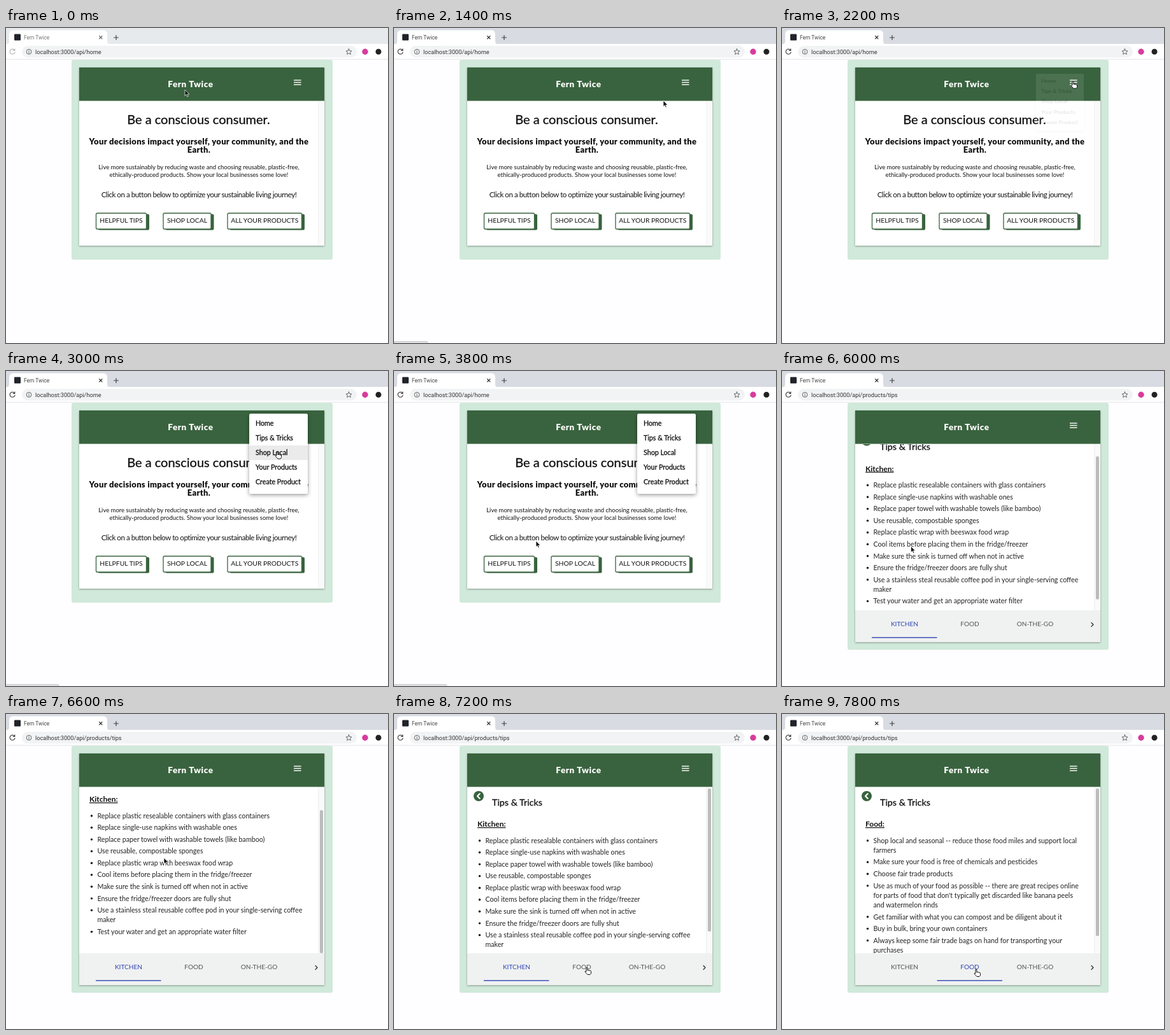
These frames come from a looping animation (600x495 px, 8 s). An HTML page:

```html
<!DOCTYPE html>
<html lang="en">
<head>
<meta charset="utf-8">
<title>Fern Twice</title>
<style>
  html, body { margin: 0; width: 100%; height: 100%; overflow: hidden; background: #fefdff; }
  svg { display: block; width: 100%; height: 100%; }
  text { font-family: Lato, sans-serif; font-size: 10.7px; fill: #111; white-space: pre; }
  .ui { font-family: Roboto, sans-serif; }
  .mid { text-anchor: middle; }
  .firm { stroke: #111; stroke-width: .3px; }
  .line { fill: none; stroke-linecap: round; stroke-linejoin: round; }
  .card { filter: drop-shadow(0 1px 1.5px rgba(0, 0, 0, .35)); }
  .pop { filter: drop-shadow(0 2px 3px rgba(0, 0, 0, .4)); }
</style>
</head>
<body>
<svg id="stage" viewBox="0 0 600 495" preserveAspectRatio="none" xmlns="http://www.w3.org/2000/svg"></svg>
<script>
const LOOP = 8000, STEP = 200;
const GREEN = '#39633e', MINT = '#d0e9da', BLUE = '#2d47b2';

const rect = (x, y, w, h, fill, more = '') =>
  `<rect x="${x}" y="${y}" width="${w}" height="${h}" fill="${fill}" ${more}/>`;
const circle = (x, y, r, fill, more = '') =>
  `<circle cx="${x}" cy="${y}" r="${r}" fill="${fill}" ${more}/>`;
const line = (d, color, width = 1.2, more = '') =>
  `<path class="line" d="${d}" stroke="${color}" stroke-width="${width}" ${more}/>`;
const text = (x, y, s, style = '', cls = '') =>
  `<text x="${x}" y="${y}" class="${cls}" style="${style}">${s.replace(/&/g, '&amp;')}</text>`;

const between = (t, a, b) => t >= a && t < b;

// Pointer path: time, x, y
const path = [
  [0, 281, 97], [400, 300, 180], [800, 392, 300], [1000, 402, 296], [1400, 423, 114],
  [2000, 457, 83], [2400, 457, 84], [2800, 428, 103], [3200, 424, 150], [3400, 404, 176],
  [3800, 223, 267], [4200, 211, 285], [4800, 183, 299], [5800, 183, 299],
  [6200, 222, 252], [6600, 248, 226], [7200, 303, 398], [7400, 305, 401], [8000, 305, 401]
];
const scrollKeys = [[5800, 0], [6200, 39], [6600, 39], [7000, 0]];
const handTimes = [[800, 1200], [2000, 2600], [2800, 3600], [4600, 5400], [7200, 8000]];
const bubbles = [[800, 1600, 53], [2800, 4000, 83], [4600, 5400, 82]];

function along(keys, t) {
  const i = keys.findIndex(k => k[0] > t);
  if (i === 0) return keys[0].slice(1);
  if (i < 0) return keys[keys.length - 1].slice(1);
  const a = keys[i - 1], b = keys[i], p = (t - a[0]) / (b[0] - a[0]);
  return a.slice(1).map((v, j) => v + (b[j + 1] - v) * p);
}

// A newline marks a wrapped line
const kitchen = [
  'Replace plastic resealable containers with glass containers',
  'Replace single-use napkins with washable ones',
  'Replace paper towel with washable towels (like bamboo)',
  'Use reusable, compostable sponges',
  'Replace plastic wrap with beeswax food wrap',
  'Cool items before placing them in the fridge/freezer',
  'Make sure the sink is turned off when not in active',
  'Ensure the fridge/freezer doors are fully shut',
  'Use a stainless steal reusable coffee pod in your single-serving coffee\nmaker',
  'Test your water and get an appropriate water filter'
];
const food = [
  'Shop local and seasonal -- reduce those food miles and support local\nfarmers',
  'Make sure your food is free of chemicals and pesticides',
  'Choose fair trade products',
  'Use as much of your food as possible -- there are great recipes online\nfor parts of food that don\'t typically get discarded like banana peels\nand watermelon rinds',
  'Get familiar with what you can compost and be diligent about it',
  'Buy in bulk, bring your own containers',
  'Always keep some fair trade bags on hand for transporting your\npurchases'
];

function browser(t) {
  const active = t >= STEP;
  const url = 'localhost:3000/api/' + (t < 5200 ? 'home' : 'products/tips');
  return rect(0, 0, 600, 26, active ? '#d8dbe1' : '#e7eaed')
    + '<path d="M0 26Q5 26 5 20V10Q5 3.500 11 3.500H153Q159 3.500 159 10V20Q159 26 164 26Z" fill="#fff"/>'
    + rect(0, 25, 600, 24, '#fff')
    + rect(0, 48.700, 600, .8, '#dcdde0')
    + rect(13, 9.500, 10, 10, '#20232a', 'rx="1"')
    + text(28, 17.500, 'Fern Twice', `font-size:8.4px;fill:${active ? '#444' : '#777'}`, 'ui')
    + line('M146.500 12.500l4.500 4.500m0-4.500l-4.500 4.500', active ? '#333' : '#666', 1.1)
    + line('M169.500 15h7m-3.500-3.500v7', '#444')
    + line('M13.200 34.600A4 4 0 1 0 14 38M13.800 32.800v2.600h-2.600', active ? '#444' : '#b5b5b5')
    + rect(25, 28, 526, 18.500, '#f1f3f4', 'rx="9.25"')
    + circle(36, 37.300, 3.900, 'none', 'stroke="#555" stroke-width=".9"')
    + line('M36 37v2.200M36 35.300v.1', '#555', 1)
    + text(46, 40.600, url, 'font-size:9.2px;fill:#333', 'ui')
    + line('M538.500 32.800l1.300 3 3.200.3-2.400 2.100.7 3.200-2.800-1.700-2.800 1.700.7-3.200-2.400-2.100 3.200-.3Z', '#555', .9)
    + circle(564, 37.300, 4.700, '#d63c9c')
    + circle(585, 37.300, 4.500, '#222');
}

function shell(bottom, cardBottom) {
  return rect(103, 50, 410, bottom - 50, MINT, 'rx="3"')
    + rect(115, 62, 385, cardBottom - 62, '#fff', 'class="card"')
    + rect(115, 62, 385, 52.500, GREEN)
    + text(290, 92.500, 'Fern Twice', 'font-size:13.5px;font-weight:900;letter-spacing:.6px;fill:#fff', 'mid')
    + [82, 85.500, 89].map(y => rect(452, y - .7, 11.500, 1.400, '#fff')).join('');
}

function button(x, w, label, hover, focus) {
  const dx = hover ? -1 : 0;
  return rect(x + 4 + dx, 292.500, w, 25, GREEN, 'rx="2"')
    + rect(x + .5, 291, w - 1, 25, '#fff', `rx="2" stroke="${focus ? '#efb050' : GREEN}" stroke-width="1.3"`)
    + text(x + w / 2 + dx, 305.500, label, 'font-size:10.4px', 'mid');
}

function home(t, [x, y]) {
  const over = (a, b) => between(x, a, b) && between(y, 291, 317);
  const press = between(t, 5000, 5400);
  const ripple = press
    ? '<clipPath id="btn"><rect x="141" y="290.500" width="80" height="26"/></clipPath>'
      + circle(185, 304, t < 5200 ? 8 : 21, '#000', 'opacity=".2" clip-path="url(#btn)"')
    : '';
  return shell(364, 342)
    + rect(490.500, 115, .8, 227, '#e6e6e6') + rect(491.300, 115, 8.700, 227, '#fbfafb')
    + text(302.500, 151, 'Be a conscious consumer.', 'font-size:20px', 'mid firm')
    + ['Your decisions impact yourself, your community, and the', 'Earth.'].map((s, i) =>
        text(303, 183 + i * 13, s, 'font-size:13px;font-weight:900;letter-spacing:.3px', 'mid')).join('')
    + ['Live more sustainably by reducing waste and choosing reusable, plastic-free,',
       'ethically-produced products. Show your local businesses some love!'].map((s, i) =>
        text(303, 221.500 + i * 12, s, 'font-size:9.5px', 'mid')).join('')
    + text(303, 265.500, 'Click on a button below to optimize your sustainable living journey!',
        'font-size:11.5px;letter-spacing:-.45px', 'mid')
    + button(141, 80, 'HELPFUL TIPS', over(141, 221), press)
    + button(246.500, 76, 'SHOP LOCAL', over(246, 322))
    + button(347.500, 117.500, 'ALL YOUR PRODUCTS', over(347, 465))
    + ripple;
}

function list(items, top) {
  let y = top;
  return items.map(item => {
    const dot = circle(134.500, y, 1.700, '#111');
    const rows = item.split('\n').map((s, i) => text(143.500, y + 3.700 + i * 15.200, s, 'fill:#222'));
    y += 18.550 + (rows.length - 1) * 15.200;
    return dot + rows.join('');
  }).join('');
}

function tips(t) {
  const scroll = along(scrollKeys, t)[0];
  const isFood = t >= 7400;
  const slide = t < 7400 ? 0 : t < 7600 ? .6 : 1;
  const tab = (x, s, on) => text(x, 401.300, s, `font-size:10.1px;fill:${on ? BLUE : '#555'}`, 'mid');
  return shell(438, 426)
    + '<clipPath id="body"><rect x="115" y="115" width="376" height="261"/></clipPath>'
    + `<g clip-path="url(#body)"><g transform="translate(0 ${-scroll})">`
    + circle(133, 129, 8, GREEN) + line('M134.700 125.300l-3.700 3.700 3.700 3.700', '#fff', 2.200)
    + text(154, 143.500, 'Tips & Tricks', 'font-size:14.3px', 'firm')
    + text(131, 177, isFood ? 'Food:' : 'Kitchen:', 'font-size:12px;font-weight:700;text-decoration:underline')
    + list(isFood ? food : kitchen, 199) + '</g></g>'
    + rect(490.500, 115, 9.500, 261, '#fafafa') + rect(490.500, 115, .8, 261, '#e8e8e8')
    + rect(493, 117 + scroll * 34 / 39, 5, isFood ? 232 : 225, '#bcbcbc', 'rx="2.5"')
    + rect(115, 376, 385, 50, '#f0f1f1')
    + (between(t, 7400, 7600) ? circle(305, 401, 20, BLUE, 'opacity=".15"') : '')
    + tab(192.500, 'KITCHEN', !isFood) + tab(295, 'FOOD', isFood) + tab(397.500, 'ON-THE-GO')
    + line('M486 395.500l3 3-3 3', '#333', 1.3)
    + rect(141 + slide * 102.500, 418.200, 102.500, 1.400, BLUE);
}

function menu(t, [x, y]) {
  if (!between(t, 2200, 4400)) return '';
  const opening = t < 2400;
  const alpha = opening ? .09 : t < 4200 ? 1 : .35;
  const scale = opening ? 'transform="translate(475 84) scale(.82 .71) translate(-475 -84)"' : '';
  const row = Math.floor((y - 71) / 23);
  const hot = !opening && t < 3600 && between(x, 382, 474) && between(row, 0, 5);
  return `<g opacity="${alpha}" ${scale}>`
    + rect(382, 67, 92, 126, '#fff', 'rx="2.5" class="pop"')
    + (hot ? rect(382, 71 + row * 23, 92, 23, '#ebebeb') : '')
    + ['Home', 'Tips & Tricks', 'Shop Local', 'Your Products', 'Create Product'].map((s, i) =>
        text(392, 86.300 + i * 23, s, '', 'firm')).join('')
    + '</g>';
}

function pointer(t, [x, y]) {
  const hand = handTimes.some(([a, b]) => between(t, a, b));
  const d = hand
    ? 'M-1 1Q0-.5 1 1V5Q2 4 3 5Q4 4.300 5 5.500Q6.500 5 6.500 6.500V9Q6 11 5 11.500H1Q-1 9.500-3 7Q-3 5.500-1 6.500Z'
    : 'M0 0V9.500L2.200 7.500L3.800 11L5.300 10.300L3.800 7H6.800Z';
  return `<path d="${d}" transform="translate(${x} ${y})" fill="${hand ? '#fff' : '#111'}"
    stroke="${hand ? '#111' : '#fff'}" stroke-width="${hand ? 1 : .7}" stroke-linejoin="round"/>`;
}

function bubble(t) {
  const b = bubbles.find(([a, z]) => between(t, a, z));
  return b ? rect(-2, 492.500, b[2] + 2, 6, '#dfe1e4', 'rx="2" stroke="#bbb" stroke-width=".7"') : '';
}

const stage = document.getElementById('stage');
let shown = -1;

function render(t) {
  const at = along(path, t);
  stage.innerHTML = rect(0, 0, 600, 495, '#fefdff') + browser(t)
    + (t < 5400 ? home(t, at) : tips(t)) + menu(t, at) + bubble(t) + pointer(t, at);
}

function tick() {
  const t = Math.floor(performance.now() % LOOP / STEP) * STEP;
  if (t !== shown) render(shown = t);
  requestAnimationFrame(tick);
}
tick();
</script>
</body>
</html>
```
